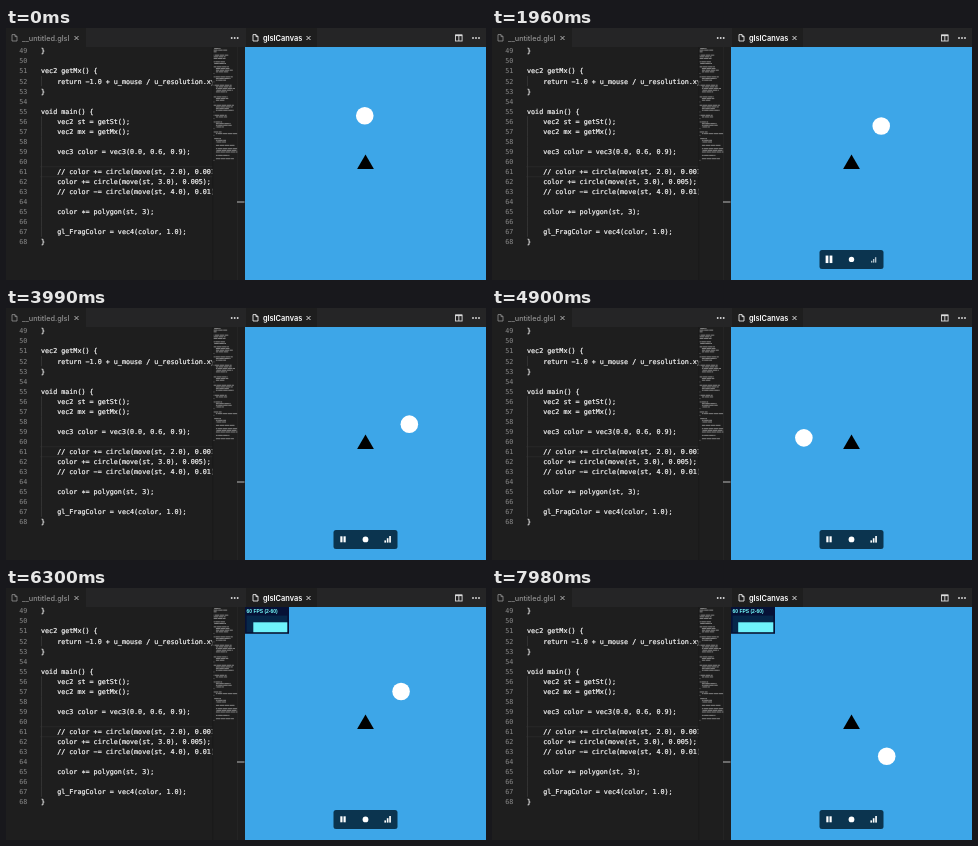
Recreate the animation shown at these times as an HTML page with a canvas. Size 480 by 252 pixels, loop 8000 ms.

```html
<!DOCTYPE html>
<html lang="en">
<head>
<meta charset="utf-8">
<title>Shader editor</title>
<style>
  html, body { margin: 0; width: 100%; height: 100%; overflow: hidden; background: #1e1e1e; }
  canvas { display: block; width: 480px; height: 252px; }
</style>
</head>
<body>
<canvas id="stage"></canvas>
<script>
const W = 480, H = 252, LOOP = 8000, STEP = 70;
const TOOLBAR_IN = 1960, HOVER_MOVE = 3290, STATS_IN = 5460;
const PANE_X = 239, PANE_Y = 19, MID_X = 359.5, MID_Y = 135.7;
const MONO = '"DejaVu Sans Mono", monospace';
const SANS = 'Inter, sans-serif';
const BLUE = '#3da6e8', CYAN = '#75fbfd';

const FIRST_LINE = 49;
const CODE = [
  '}',
  '',
  'vec2 getMx() {',
  '    return -1.0 + u_mouse / u_resolution.xy',
  '}',
  '',
  'void main() {',
  '    vec2 st = getSt();',
  '    vec2 mx = getMx();',
  '',
  '    vec3 color = vec3(0.0, 0.6, 0.9);',
  '',
  '    // color += circle(move(st, 2.0), 0.001',
  '    color += circle(move(st, 3.0), 0.005);',
  '    // color -= circle(move(st, 4.0), 0.01)',
  '',
  '    color *= polygon(st, 3);',
  '',
  '    gl_FragColor = vec4(color, 1.0);',
  '}'
];

// Line lengths above the visible code; 0 is blank, negative is indented.
const EARLIER = [
  12, 24, 6, 0, 26, 21, 21, 0, 20, 22, 0, 27, -24, -30, -22, 1,
  0, 34, -26, -18, 1, 0, 32, -28, -34, -30, -20, 1, 0, 25, -22, -16,
  1, 0, 36, -30, -24, -32, 1, 0, 23, -20, 1, 0, 15, -26, -28, -14
];

const canvas = document.getElementById('stage');
const scale = window.devicePixelRatio || 1;
canvas.width = W * scale;
canvas.height = H * scale;
const ctx = canvas.getContext('2d');

function rect(c, color, x, y, w, h) {
  c.fillStyle = color;
  c.fillRect(x, y, w, h);
}

function disc(c, color, x, y, r) {
  c.fillStyle = color;
  c.beginPath();
  c.arc(x, y, r, 0, Math.PI * 2);
  c.fill();
}

function path(c, color, width, points) {
  c.strokeStyle = color;
  c.lineWidth = width;
  c.beginPath();
  points.forEach(([x, y]) => c.lineTo(x, y));
  c.stroke();
}

function text(c, str, x, y, font, color, align = 'left') {
  c.font = font;
  c.fillStyle = color;
  c.textAlign = align;
  c.fillText(str, x, y);
}

function cross(c, x, y, color) {
  path(c, color, 1, [[x - 2, y - 2], [x + 2, y + 2]]);
  path(c, color, 1, [[x + 2, y - 2], [x - 2, y + 2]]);
}

function dots(c, x, y) {
  for (let i = -1; i <= 1; i++) disc(c, '#dcdcdc', x + i * 3, y, 0.95);
}

function pageIcon(c, x, y, color) {
  path(c, color, 0.8, [
    [x + 3, y], [x, y], [x, y + 6.4], [x + 5, y + 6.4], [x + 5, y + 2], [x + 3, y], [x + 3, y + 2], [x + 5, y + 2]
  ]);
}

function drawTab(c, x, width, label, color, font) {
  rect(c, '#1e1e1e', x, 0, width, PANE_Y);
  pageIcon(c, x + 7, 6.6, color);
  text(c, label, x + 17, 12.6, font, color);
}

function drawTabs(c) {
  rect(c, '#252526', 0, 0, W, PANE_Y);
  drawTab(c, -1, 81, '__untitled.glsl', '#929292', `500 7.3px ${SANS}`);
  cross(c, 70.5, 10, '#b0b0b0');
  dots(c, 228.7, 10);
  drawTab(c, 240, 71, 'glslCanvas', '#fff', `600 7.4px ${SANS}`);
  cross(c, 302.5, 10, '#dcdcdc');
  dots(c, 470, 10);
  c.strokeStyle = '#dcdcdc';
  c.lineWidth = 0.9;
  c.strokeRect(449.5, 7, 6.6, 6);
  rect(c, '#dcdcdc', 449.5, 6.6, 6.6, 1.5);
  rect(c, '#dcdcdc', 452.4, 7, 0.9, 6);
}

// The editor font has a wide minus and a centred asterisk.
const codeGlyphs = line => line.replace(/-/g, '\u2212').replace(/\*/g, '\u2217');

function drawCode(c) {
  c.save();
  c.beginPath();
  c.rect(0, PANE_Y, 207, H);
  c.clip();
  rect(c, '#2a2a2a', 34, 138.4, 174, 0.8);
  rect(c, '#2a2a2a', 34, 148.4, 174, 0.8);
  CODE.forEach((line, i) => {
    const n = FIRST_LINE + i;
    const mid = 23 + i * 10.04;
    const font = `6.72px ${MONO}`;
    const shown = codeGlyphs(line);
    if (n === 52 || (n > 55 && n < 68)) rect(c, '#404040', 35, mid - 5, 0.6, 10.04);
    text(c, n, 21.3, mid + 2.4, font, '#8a8a8a', 'right');
    text(c, shown, 35, mid + 2.4, font, '#f2f2f2');
    c.strokeStyle = '#f2f2f2';
    c.lineWidth = 0.22;
    c.strokeText(shown, 35, mid + 2.4);
  });
  c.restore();
}

function drawMinimap(c) {
  const pitch = 1.67, unit = 0.56;
  const row = (i, from, to) => {
    for (let k = from; k < to; k++) {
      const gap = (k * 7 + i * 5) % 9 === 0;
      if (!gap) rect(c, 'rgba(230,230,230,.58)', 207.7 + k * unit, 20 + i * pitch, unit, 0.95);
    }
  };
  rect(c, '#191919', 206.3, PANE_Y, 0.8, H);
  EARLIER.forEach((len, i) => row(i, len < 0 ? 4 : 0, len < 0 ? 4 - len : len));
  CODE.forEach((line, i) => row(EARLIER.length + i, line.search(/\S|$/), line.length));
  rect(c, '#2b2b2b', 231, PANE_Y, 0.5, H);
  rect(c, '#b8b8b8', 231, 173.5, 7.5, 1);
}

function makeBackdrop() {
  const layer = document.createElement('canvas');
  layer.width = canvas.width;
  layer.height = canvas.height;
  const c = layer.getContext('2d');
  c.scale(scale, scale);
  rect(c, '#1e1e1e', 0, 0, W, H);
  drawTabs(c);
  drawCode(c);
  drawMinimap(c);
  rect(c, BLUE, PANE_X, PANE_Y, W - PANE_X, H);
  return layer;
}

function drawShader(frame) {
  const angle = -Math.PI / 2 - 0.015 - frame * 0.2;
  disc(ctx, '#fff', MID_X + 48 * Math.cos(angle), MID_Y + 48 * Math.sin(angle), 8.8);
  ctx.fillStyle = '#000';
  ctx.beginPath();
  ctx.moveTo(MID_X, 126.5);
  ctx.lineTo(MID_X + 8.4, 141);
  ctx.lineTo(MID_X - 8.4, 141);
  ctx.fill();
}

function drawToolbar(time) {
  const onPause = time < HOVER_MOVE;
  ctx.fillStyle = '#0b344f';
  ctx.beginPath();
  ctx.roundRect(MID_X - 32, 222, 64, 19, 2.5);
  ctx.fill();

  const p = onPause ? 1.25 : 1;
  for (const side of [-1, 1]) {
    rect(ctx, '#fff', MID_X - 22.5 + (side * 1.6 - 1.1) * p, 231.3 - 3 * p, 2.2 * p, 6 * p);
  }
  disc(ctx, '#fff', MID_X, 231.4, onPause ? 2.7 : 2.9);

  const s = onPause ? 0.9 : 1.1;
  for (let i = 0; i < 3; i++) {
    const h = (2 + i * 2) * s;
    rect(ctx, onPause ? '#b4c3cd' : '#fff', MID_X + 22.2 + (i * 2.2 - 3) * s, 234.6 - h, 1.5 * s, h);
  }
}

function drawStats(time) {
  const shift = Math.floor((time - STATS_IN) / 1050) * 0.55;
  ctx.globalAlpha = 0.9;
  rect(ctx, BLUE, PANE_X, PANE_Y, 44, 26.6);
  ctx.clearRect(PANE_X, PANE_Y, 44, 26.6);
  rect(ctx, BLUE, PANE_X, PANE_Y, 44, 26.6);
  ctx.globalAlpha = 1;
  rect(ctx, '#061136', PANE_X, PANE_Y, 44, 26.6);
  text(ctx, '60 FPS (2-60)', PANE_X + 1.6, 24.7, 'bold 4.95px "Liberation Sans", Arial, sans-serif', CYAN);
  rect(ctx, '#06274a', PANE_X + 1.6, 27.6, 40.7, 16.5);
  rect(ctx, '#6ff2fb', PANE_X + 8.3 - shift, 34.3, 34 + shift, 9.9);
}

const backdrop = makeBackdrop();
const start = performance.now();

function draw(now) {
  const time = Math.max(0, now - start) % LOOP;
  const frame = Math.floor(time / STEP);
  ctx.setTransform(1, 0, 0, 1, 0, 0);
  ctx.drawImage(backdrop, 0, 0);
  ctx.scale(scale, scale);
  drawShader(frame);
  if (time >= TOOLBAR_IN) drawToolbar(time);
  if (time >= STATS_IN) drawStats(time);
  requestAnimationFrame(draw);
}
draw(start);
</script>
</body>
</html>
```
